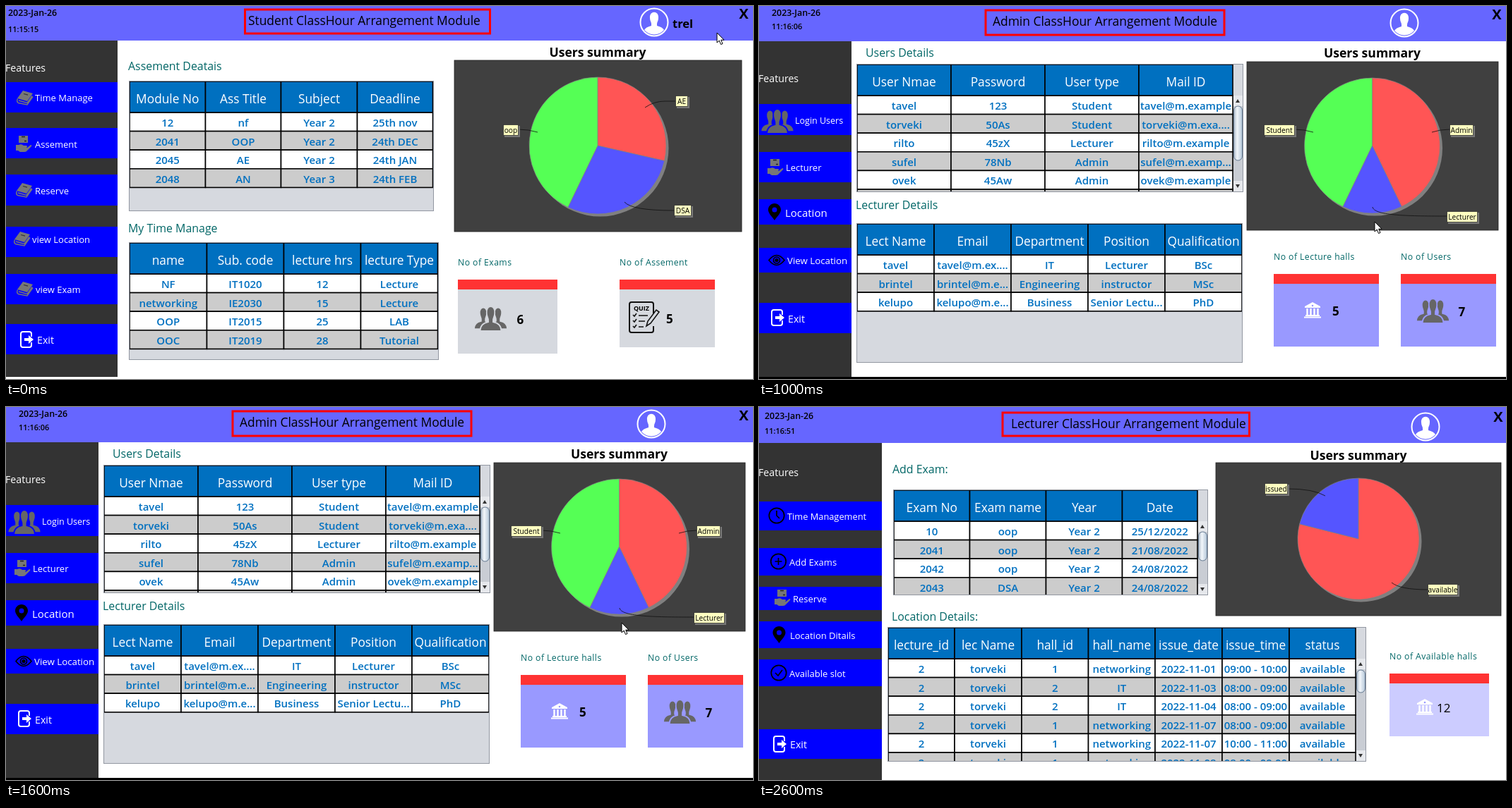
An HTML page that plays this animation: 1058x529 px, repeating every 3000 ms.

```html
<!DOCTYPE html>
<html lang="en">
<head>
<meta charset="utf-8">
<title>Class planner dashboards</title>
<style>
  html, body { margin: 0; width: 100%; height: 100%; overflow: hidden; background: #fff; }
  svg { display: block; }
  text { font-family: "Open Sans", "Noto Sans", sans-serif; white-space: pre; }
</style>
</head>
<body>
<svg id="stage" width="100%" height="100%" viewBox="0 0 1058 529">
  <defs>
    <linearGradient id="thumb">
      <stop offset="0" stop-color="#aebccb"/><stop offset=".4" stop-color="#f2f6fa"/><stop offset="1" stop-color="#b3c6d8"/>
    </linearGradient>
    <g id="book">
      <path d="M9 1 23 5 15 16 1 12Z" fill="#777"/>
      <path d="M1.5 12.500q-2 4 1 6L15 21 23 9.500M3 15l12 3.500 7-10M11 5l6 1.700" fill="none" stroke="#777" stroke-width="1.5"/>
      <path d="M10 5.500l6 1.700" stroke="#333" stroke-width="1.200"/>
    </g>
    <g id="hand" fill="#777">
      <path d="M4 0h13v10H4Z"/><path d="M8 1.500h5M12 7.500h3" stroke="#222" stroke-width="1.300"/>
      <path d="M0 13h4q4-2 7 1h4q2 1 0 3h-5 6l5-4q2 0 1 2l-6 6q-1 2-4 2H6l-3-2H0Z"/>
    </g>
    <g id="bust">
      <path d="M-5-3C-6-14 6-14 5-3 5 1 3 3 3 5L3 8Q13 10 13 19H-13Q-13 10-3 8V5C-3 3-5 1-5-3Z"/>
    </g>
    <g id="group" fill="#666" stroke="currentColor" stroke-width="1.500">
      <use href="#bust" x="12" y="13"/><use href="#bust" x="33" y="13"/>
      <use href="#bust" transform="translate(22.500 13) scale(1.150)"/>
    </g>
    <g id="bank" fill="#fff">
      <path d="M12 0 23 6V8H1V6ZM2 18H22V20H2ZM0 20.500H24V22.500H0Z"/>
      <path d="M4.500 9V18M9.500 9V18M14.500 9V18M19.500 9V18" stroke="#fff" stroke-width="2.400"/>
      <circle cx="12" cy="5" r="1.300" fill="#99f"/>
    </g>
    <g id="exit" fill="none" stroke="#fff" stroke-width="2">
      <path d="M16 8V4Q16 1 13 1H4Q1 1 1 4V20Q1 23 4 23H13Q16 23 16 20V16"/>
      <path d="M6 10H12V6L19 12 12 18V14H6Z" fill="#fff" stroke="none"/>
    </g>
    <path id="pin" d="M9 0C4 0 0 4 0 9 0 14 5 18 9 24 13 18 18 14 18 9 18 4 14 0 9 0ZM9 5.500A3.500 3.500 0 1 1 9 12.500 3.500 3.500 0 1 1 9 5.500Z" fill-rule="evenodd"/>
    <g id="eye" fill="none" stroke="#000" stroke-width="1.600">
      <path d="M1 8Q12-6 23 8 12 22 1 8Z"/><circle cx="12" cy="8" r="4.500"/><circle cx="12" cy="8" r="1.800" fill="#000"/>
    </g>
    <g id="ring" fill="none" stroke="#000" stroke-width="1.700"><circle r="10.700"/></g>
    <g id="clock" fill="none" stroke="#000" stroke-width="1.700"><use href="#ring"/><path d="M0-7V0L4 4"/></g>
    <g id="plus" fill="none" stroke="#000" stroke-width="1.700"><use href="#ring"/><path d="M0-5V5M-5 0H5"/></g>
    <g id="check" fill="none" stroke="#000" stroke-width="1.700"><use href="#ring"/><path d="M-5 0-1 4 5-4"/></g>
    <g id="avatar">
      <circle r="19.500" fill="#66f" stroke="#fff" stroke-width="2"/>
      <path d="M-6-6C-7-17 7-17 6-6 6-2 4 0 4 2V5Q12 7 14 11 8 17.500 0 17.500-8 17.500-14 11-12 7-4 5V2C-4 0-6-2-6-6Z" fill="#fff"/>
    </g>
    <g id="paper" fill="none" stroke="#111" stroke-width="2">
      <path d="M35 17V4Q35 1 32 1H4Q1 1 1 4V41Q1 44 4 44H32Q35 44 35 41V35"/>
      <path d="M6 19l2 2 3-4M6 27l2 2 3-4M6 35l2 2 3-4M14 20H27M14 28H23M14 36H21" stroke-width="1.600"/>
      <path d="M25 35 27 28 39 12 43 15 31 31Z" fill="#d6d9df" stroke-width="1.600"/>
    </g>
    <path id="cursor" d="M0 0V14L3.200 11 5.500 16.500 8 15.500 5.700 10.200H10Z" fill="#fff" stroke="#000"/>
  </defs>
</svg>
<script>
const TEAL = '#006666', BLUE = '#0070c0', GRAY = '#d6d9df';

const rect = (x, y, right, bottom, fill, extra = '') =>
  `<rect x="${x}" y="${y}" width="${right - x}" height="${bottom - y}" fill="${fill}" ${extra}/>`;

const text = (x, y, label, size, { fill = '#000', weight = 400, anchor = 'start', spacing = 0 } = {}) =>
  `<text x="${x}" y="${y}" font-size="${size}" fill="${fill}" font-weight="${weight}" text-anchor="${anchor}" letter-spacing="${spacing}">${label}</text>`;

const icon = (name, x, y, color = '#00f') =>
  `<use href="#${name}" transform="translate(${x} ${y})" color="${color}"/>`;

const heading = (x, y, label) => text(x, y, label, 15.9, { fill: TEAL });
const bold = (x, y, label, size, anchor) => text(x, y, label, size, { weight: 700, anchor });

function header({ height, clock, title, box, titleAt, avatar, close }) {
  const [x, dateY, timeY, time] = clock;
  return rect(0, 0, 1058, height, '#66f')
    + text(x, dateY, '2023-Jan-26', 12.4, { weight: 600 })
    + text(x, timeY, time, 10.9, { weight: 600 })
    + rect(...box, 'none', 'stroke="#f00" stroke-width="3"')
    + text(...titleAt, `${title} ClassHour Arrangement Module`, 17.4)
    + icon('avatar', ...avatar) + bold(...close, 'X', 20, 'middle');
}

// Each button: top, bottom, icon, icon x, icon y, label x, baseline, label, font size.
function sidebar(top, right, bottom, featuresY, buttons) {
  return rect(0, top, right, bottom, '#333')
    + text(-1, featuresY, 'Features', 14.2, { fill: '#fff' })
    + buttons.map(([y, end, name, ix, iy, x, base, label, size = 13]) =>
        rect(0, y, right, end, '#00f') + icon(name, ix, iy) + text(x, base, label, size, { fill: '#fff' })).join('');
}

function scrollbar(left, right, top, bottom, [thumbTop, thumbBottom]) {
  const mid = (left + right) / 2;
  return rect(left + 1, top, right, bottom, '#c9cdd4')
    + rect(left + 1, top, right, top + 15, '#e6e8ec') + rect(left + 1, bottom - 15, right, bottom, '#e6e8ec')
    + `<path d="M${mid - 3} ${top + 10}h6l-3-5zM${mid - 3} ${bottom - 10}h6l-3 5z" fill="#333"/>`
    + rect(left + 1.5, thumbTop, right - .5, thumbBottom, 'url(#thumb)', 'rx="6" stroke="#62778f"');
}

function table([x, y, right, bottom], edges, titles, rows, thumb) {
  const headTop = y + 1, bodyTop = y + 45, rowHeight = 26.6;
  const cells = (top, height, fill, labels, base, size, style) => labels.map((label, i) =>
    rect(edges[i], top, edges[i + 1], top + height, fill, 'stroke="#000" stroke-width="1.6"')
    + text((edges[i] + edges[i + 1]) / 2, top + base, label, size, { ...style, anchor: 'middle' })).join('');
  const body = rows.map((row, i) =>
    cells(bodyTop + i * rowHeight, rowHeight, i % 2 ? '#ccc' : '#fff', row.split('|'), 20, 15, { fill: BLUE, weight: 600 })).join('');
  return `<svg x="${x}" y="${y}" width="${right - x}" height="${bottom - y}" viewBox="${x} ${y} ${right - x} ${bottom - y}">`
    + rect(x, y, right, bottom, GRAY) + body
    + cells(headTop, 44, BLUE, titles.split('|'), 30.5, 17.3, { fill: '#fff', weight: 500 })
    + (thumb ? scrollbar(edges.at(-1), right - 1, bodyTop, bottom - 1, thumb) : '')
    + rect(x + .5, y + .5, right - .5, bottom - .5, 'none', 'stroke="#9297a1"') + '</svg>';
}

// Slices run clockwise from the top; each label has a box and a leader path.
function pie(box, titleY, cx, cy, r, slices, labels) {
  let angle = 0;
  const point = a => `${cx + r * Math.sin(a)} ${cy - r * Math.cos(a)}`;
  const wedges = slices.map(([share, fill]) => {
    const start = angle;
    angle += share * 2 * Math.PI;
    return `<path d="M${cx} ${cy}L${point(start)}A${r} ${r} 0 ${+(share > .5)} 1 ${point(angle)}Z" fill="${fill}" stroke="#808080" stroke-width=".7"/>`;
  }).join('');
  const tags = labels.map(([x, y, right, bottom, label, leader]) =>
    `<path d="${leader}" fill="none" stroke="#111" stroke-width=".8"/>`
    + rect(x + 2, y + 2, right + 2, bottom + 2, '#777')
    + rect(x + .5, y + .5, right - .5, bottom - .5, '#ffffc0', 'stroke="#333" stroke-width=".8"')
    + text((x + right) / 2, y + 12, label, 10.2, { anchor: 'middle' })).join('');
  return bold(cx, titleY, 'Users summary', 17.6, 'middle')
    + rect(...box, '#404040', 'stroke="#222" stroke-width=".8"')
    + `<circle cx="${cx + 3.5}" cy="${cy + 3.5}" r="${r}" fill="#808080"/>` + wedges + tags;
}

const card = (x, y, right, bottom, fill, label, labelY) =>
  text(x, labelY, label, 12.2, { fill: TEAL, spacing: .45 })
  + rect(x, y, right, bottom, fill) + rect(x, y, right, y + 14, '#f33');

const RED = '#f55', INDIGO = '#55f', GREEN = '#5f5';

const studentView = header({
  height: 49, clock: [3, 14, 37, '11:15:15'], title: 'Student', box: [338.5, 5, 685.5, 39],
  titleAt: [343, 27], avatar: [918, 23], close: [1045, 18],
}) + bold(944, 31, 'trel', 16.5)
  + sidebar(49, 158, 526, 93, [
    [108, 151, 'book', 15, 119, 41, 135, 'Time Manage'],
    [173, 216, 'hand', 14, 184, 41, 201, 'Assement'],
    [239, 283, 'book', 14, 250, 41, 267, 'Reserve'],
    [313, 356, 'book', 11, 319, 37, 336, 'view Location'],
    [380, 423, 'book', 15, 390, 42, 407, 'view Exam'],
    [451, 494, 'exit', 20, 461, 44, 479, 'Exit', 14.2],
  ])
  + heading(173, 91, 'Assement Deatais')
  + table([174, 106, 606, 291], [175, 282.5, 389.5, 497.5, 604.5], 'Module No|Ass Title|Subject|Deadline', [
    '12|nf|Year 2|25th nov', '2041|OOP|Year 2|24th DEC', '2045|AE|Year 2|24th JAN', '2048|AN|Year 3|24th FEB',
  ])
  + heading(173, 321, 'My Time Manage')
  + table([174, 335, 613, 502], [175, 284.5, 393.5, 502.5, 611.5], 'name|Sub. code|lecture hrs|lecture Type', [
    'NF|IT1020|12|Lecture', 'networking|IE2030|15|Lecture', 'OOP|IT2015|25|LAB', 'OOC|IT2019|28|Tutorial',
  ])
  + pie([635, 77, 1042, 320], 72, 838, 198, 97, [[2 / 7, RED], [2 / 7, INDIGO], [3 / 7, GREEN]], [
    [948, 127, 966, 143, 'AE', 'M905 144Q918 135 933 135H948'],
    [704, 168, 726, 184, 'oop', 'M726 175Q740 175 753 179'],
    [946, 282, 971, 298, 'DSA', 'M876 278Q886 290 946 290'],
  ])
  + card(640, 388, 781, 493, GRAY, 'No of Exams', 368) + icon('group', 664, 426, GRAY) + bold(723.5, 451, '6', 17)
  + card(869, 388, 1004, 484, GRAY, 'No of Assement', 368) + icon('paper', 882, 419)
  + bold(900, 432, 'QUIZ', 9, 'middle') + bold(935, 450, '5', 17)
  + icon('cursor', 1007, 38);

const adminView = header({
  height: 50, clock: [18, 14, 33, '11:16:06'], title: 'Admin', box: [321, 6, 659, 41],
  titleAt: [331, 28], avatar: [914, 24], close: [1045, 19],
}) + sidebar(50, 131, 526, 108, [
    [139, 183, 'group', 3.5, 146, 51, 167, 'Login Users', 12.5],
    [207, 250, 'hand', 12, 217, 38, 234, 'Lecturer'],
    [274, 310, 'pin', 13, 280, 37, 299, 'Location', 15],
    [343, 378, 'eye', 13, 352.5, 40, 366, 'View Location', 13.3],
    [421, 464, 'exit', 17, 430, 41, 449, 'Exit', 14.2],
  ])
  + heading(151, 72, 'Users Details')
  + table([138, 82, 686, 264], [139, 272, 405, 538, 671], 'User Nmae|Password|User type|Mail ID', [
    'tavel|123|Student|tavel@m.example', 'torveki|50As|Student|torveki@m.exa....', 'rilto|45zX|Lecturer|rilto@m.example',
    'sufel|78Nb|Admin|sufel@m.examp...', 'ovek|45Aw|Admin|ovek@m.example', '|||',
  ], [142, 219])
  + heading(137, 288, 'Lecturer Details')
  + table([138, 308, 685, 506], [139, 248, 357, 466, 575, 684], 'Lect Name|Email|Department|Position|Qualification', [
    'tavel|tavel@m.ex....|IT|Lecturer|BSc', 'brintel|brintel@m.e...|Engineering|instructor|MSc',
    'kelupo|kelupo@m.e...|Business|Senior Lectu...|PhD',
  ])
  + pie([691, 79, 1047, 318], 73, 868.5, 198, 96, [[3 / 7, RED], [1 / 7, INDIGO], [3 / 7, GREEN]], [
    [715, 168, 759, 184, 'Student', 'M759 175Q772 175 785 179'],
    [978, 168, 1012, 184, 'Admin', 'M953 179Q965 175 978 175'],
    [974, 291, 1018, 307, 'Lecturer', 'M869 285C871 297 915 298 974 298'],
  ])
  + card(729, 380, 878, 483, '#99f', 'No of Lecture halls', 360) + icon('bank', 772, 420) + bold(812, 439, '5', 17)
  + card(909, 380, 1044, 483, '#99f', 'No of Users', 360) + icon('group', 932, 415, '#99f') + bold(990.5, 440, '7', 17)
  + rect(0, 526, 1058, 529, '#000') + icon('cursor', 872, 306);

const lecturerView = header({
  height: 51, clock: [8, 17, 38, '11:16:51'], title: 'Lecturer', box: [345, 8, 694.5, 41],
  titleAt: [357, 30], avatar: [944, 28], close: [1047, 21],
}) + sidebar(51, 174, 529, 98, [
    [134, 175, 'clock', 25, 154, 40, 160, 'Time Management', 12.8],
    [200, 239, 'plus', 27.5, 219, 43, 225, 'Add Exams'],
    [255, 288, 'hand', 22, 259, 48, 277, 'Reserve'],
    [304, 342, 'pin', 19.5, 311, 44, 329, 'Location Ditails'],
    [358, 396, 'check', 28, 377, 43, 383, 'Available slot'],
    [457, 499, 'exit', 20, 466, 44, 484, 'Exit', 14.2],
  ])
  + heading(189, 94, 'Add Exam:')
  + table([190, 117, 636, 267], [191, 298.5, 406.5, 514.5, 621], 'Exam No|Exam name|Year|Date', [
    '10|oop|Year 2|25/12/2022', '2041|oop|Year 2|21/08/2022', '2042|oop|Year 2|24/08/2022', '2043|DSA|Year 2|24/08/2022',
  ], [177, 218])
  + heading(188, 303, 'Location Details:')
  + table([182, 312, 860, 503], [183, 277, 372, 466.5, 561, 656, 751, 845],
    'lecture_id|lec Name|hall_id|hall_name|issue_date|issue_time|status', [
      '1|networking|2022-11-01|09:00 - 10:00', '2|IT|2022-11-03|08:00 - 09:00', '2|IT|2022-11-04|08:00 - 09:00',
      '1|networking|2022-11-07|08:00 - 09:00', '1|networking|2022-11-07|10:00 - 11:00', '1|networking|2022-11-08|08:00 - 09:00',
    ].map(row => `2|torveki|${row}|available`), [373, 405])
  + pie([647, 79, 1051, 296], 75, 849, 187, 86, [[15 / 19, RED], [4 / 19, INDIGO]], [
    [716, 108, 749, 124, 'issued', 'M749 116Q785 116 802 126'],
    [947, 251, 990, 267, 'available', 'M896 249Q908 259 947 259'],
  ])
  + card(893, 378, 1034, 467, '#ccf', 'No of Available halls', 358) + icon('bank', 931, 414) + text(960, 433, '12', 17);

const stage = document.getElementById('stage');
stage.insertAdjacentHTML('beforeend',
  [studentView, adminView, lecturerView].map(view => `<g class="view" display="none">${view}</g>`).join(''));
const views = [...stage.querySelectorAll('.view')];

function draw(now) {
  const current = Math.floor(now / 1000) % views.length;
  views.forEach((view, i) => view.setAttribute('display', i === current ? 'inline' : 'none'));
  requestAnimationFrame(draw);
}
draw(performance.now());
</script>
</body>
</html>
```
